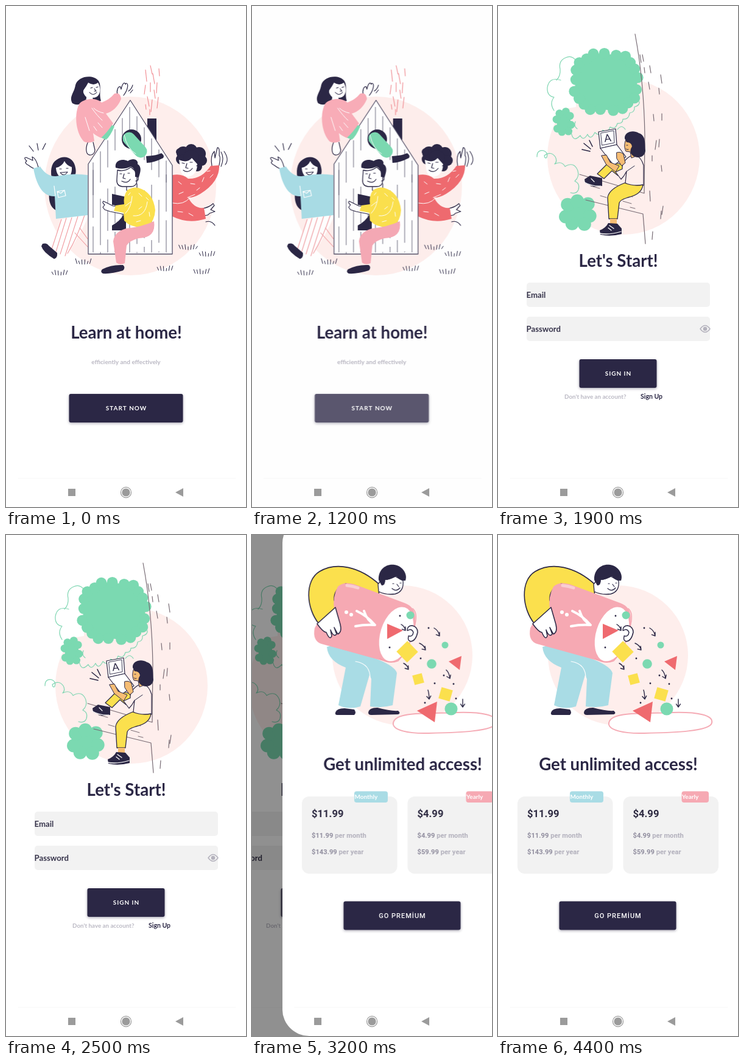
Recreate the animation shown at these times as an HTML page with a canvas. Size 394 by 824 pixels, loop 4900 ms.

```html
<!DOCTYPE html>
<html lang="en">
<head>
<meta charset="utf-8">
<title>Onboarding</title>
<style>
  html, body { margin: 0; width: 100%; height: 100%; overflow: hidden; background: #fff; }
  canvas { display: block; width: 394px; height: 824px; }
</style>
</head>
<body>
<canvas id="stage"></canvas>
<script>
const W = 394, H = 824, LOOP = 4900, STEP = 100;
const DPR = window.devicePixelRatio || 1;
const INK = '#2b2745', BLUSH = '#feeeec', PINK = '#f6a9b3', RED = '#ef6a6f', MINT = '#7bd9b1',
      YELLOW = '#fbe04d', SKY = '#a9dce5', GREY = '#f2f2f2', FAINT = '#bbb9c4', SKIN = '#f6bd74';
let g;

function layer(canvas) {
  canvas.width = W * DPR;
  canvas.height = H * DPR;
  const c = canvas.getContext('2d');
  c.scale(DPR, DPR);
  c.lineCap = c.lineJoin = 'round';
  return c;
}

function path(d, fill, stroke, width = 1.2) {
  const p = new Path2D(d);
  if (fill) { g.fillStyle = fill; g.fill(p); }
  if (stroke) { g.strokeStyle = stroke; g.lineWidth = width; g.stroke(p); }
}
const line = (d, color = INK, width = 1.2) => path(d, null, color, width);

function oval(x, y, rx, ry, fill, rot = 0) {
  g.beginPath();
  g.ellipse(x, y, rx, ry, rot, 0, 7);
  g.fillStyle = fill;
  g.fill();
}
const dot = (x, y, r, fill = INK) => oval(x, y, r, r, fill);

function box(x, y, w, h, r, fill) {
  g.beginPath();
  g.roundRect(x, y, w, h, r);
  g.fillStyle = fill;
  g.fill();
}

function text(s, x, y, font, color = INK, align = 'left', spacing = 0) {
  g.font = font;
  g.fillStyle = color;
  g.textAlign = align;
  g.textBaseline = 'alphabetic';
  g.letterSpacing = spacing + 'px';
  g.fillText(s, x + (align === 'center' ? spacing / 2 : 0), y);
  g.letterSpacing = '0px';
}
const lato = size => `bold ${size}px Lato, "Open Sans", sans-serif`;
const roboto = (size, weight = 'bold') => `${weight} ${size}px Roboto, Arial, sans-serif`;
const title = (s, y) => text(s, 197.5, y, lato(27.6), INK, 'center');

function button([x, y, w, h], label, font) {
  g.save();
  g.shadowColor = 'rgba(42,38,67,.4)';
  g.shadowBlur = 4 * DPR;
  g.shadowOffsetY = 1.5 * DPR;
  box(x, y, w, h, 3, INK);
  g.restore();
  text(label, x + w / 2, y + h / 2 + 3.8, font, '#fff', 'center', 1);
}

// Leafy shape: a squarish oval ringed with lobes.
function bush(x, y, rx, ry, n, r) {
  const bend = v => Math.sign(v) * Math.abs(v) ** .82;
  const rim = Array.from({ length: n }, (_, i) => {
    const a = i / n * Math.PI * 2 + .2, k = 1 + .04 * Math.sin(i * 2.3);
    return [x + bend(Math.cos(a)) * rx * k, y + bend(Math.sin(a)) * ry * k];
  });
  path('M' + rim.join('L') + 'Z', MINT);
  rim.forEach(([px, py]) => dot(px, py, r, MINT));
}

function grass(x, y, n) {
  for (let i = 0; i < n; i++) {
    const k = i - (n - 1) / 2;
    line(`M${x + k * 4.2} ${y - Math.abs(k) * .6}l${k * .9} ${-4 - 4 * Math.abs(Math.sin(i * 2 + x))}`, INK, 1);
  }
}

function house() {
  g.save();
  const wall = 'M204 155L135 260V408H273V262Z';
  path(wall, '#fff');
  g.clip(new Path2D(wall));
  for (let i = 0; i < 11; i++) {
    const x = 143 + i * 12, top = 155 + Math.abs(x - 204) * 1.52;
    const len = 28 + 25 * Math.abs(Math.cos(i * 2.7)), low = 270 + 50 * Math.abs(Math.sin(i * 1.9));
    line(`M${x} ${top + 10}v${len}M${x} ${low}V${low + len + 25}M${x} ${low + len + 40}V405`, '#5d5a70', .9);
  }
  g.restore();
  line(wall, '#55526a', 1.3);
}

function climber() {
  path('M109 160C103 149 112 143 114 130C118 115 142 112 151 122C158 130 152 143 156 156L148 158L132 152Q122 167 109 160Z', INK);
  path('M127 139C130 134 132 132 135 126Q144 132 151 126C157 136 155 151 143 151V159H131L132 150Q126 144 127 139Z', '#fff');
  line('M131 150V158M143 151V158M139 135l3-1M148 134l3-1M145 136l3 4l-3 0M137 142Q143 149 149 142', INK, 1.1);
  path('M183 147C181 139 184 131 188 133L189 137C191 127 195 124 196 129L197 127C202 127 200 138 193 147', '#fff', INK);
  line('M201 140q5-3 7-10M204 143l4-5', INK, 1.1);
  path('M139 218C133 223 130 235 133 242C136 247 145 246 146 237L143 224', '#fff', INK);
  path('M153 215L168 193L178 198Q171 215 164 220Z', MINT);
  path('M121 160C131 151 149 151 157 159Q170 154 178 144Q188 141 189 153Q181 172 164 177L176 193Q166 208 156 217Q147 213 143 209L145 222Q137 227 128 223C113 207 112 174 121 160Z', '#f9adb8');
  line('M141 168Q150 181 158 188M160 176Q150 174 144 168M130 183l7 22M151 192l7 8M144 198l5 7', '#fff', 1);
}

function runner() {
  path('M83 253C97 243 112 251 114 266C117 280 109 284 105 287L100 330Q94 343 82 336C67 328 69 304 76 288C72 271 74 259 83 253Z', INK);
  path('M82 266Q92 264 96 255Q99 262 108 265C109 278 102 285 95 284Q83 281 82 266Z', '#fff');
  line('M88 268h3M99 267h3M89 274Q95 282 101 273Z', INK, 1.2);
  path('M53 265Q49 250 43 248L44 254L33 249Q28 249 34 255Q29 258 37 262Q42 266 47 268', '#fff', INK);
  line('M38 230l7 9M51 226l2 11M65 226l-5 10', INK, 1.2);
  path('M91 351L75 400L98 412Q124 373 134 348V340Z', '#fff');
  line('M91 351L75 400M99 349L82 404M108 348L89 408M118 346L97 411M129 344Q117 381 101 407M113 373L134 396M121 365L134 383', '#f09a9f', 1.1);
  path('M45 267L56 264Q67 281 82 280Q108 274 134 278V344L82 350L80 313C61 314 50 295 45 267Z', SKY);
  line('M84 305l12-2l2 9l-12 3ZM84 305l6 3l6-5M81 312L79 296', '#fff', 1.2);
  path('M60 391Q67 389 70 394L84 406Q85 414 79 416Q61 405 58 395Z', INK);
}

function waver() {
  [[291, 242, 11], [304, 237, 10], [317, 243, 11], [321, 254, 9], [314, 264, 8], [288, 252, 9], [285, 240, 6], [304, 250, 13]]
    .forEach(([x, y, r]) => dot(x, y, r));
  path('M284 253Q298 259 305 250L314 260Q314 278 299 281Q287 280 286 266Z', '#fff');
  line('M289 258l4 1M302 257l4 0M297 259l-2 7l4 1M291 270Q299 276 306 267M313 263q4-4 3 3', INK, 1.2);
  path('M338 263Q335 246 342 239L343 250L347 233Q351 232 350 246Q353 248 349 266', '#fff', INK);
  line('M353 240q6 10 0 24M358 239q9 13 2 22M328 355q9-3 15 6', INK, 1.1);
  path('M323 333Q334 331 340 325L342 328L336 335L343 338L334 341Q331 346 322 344', '#fff', INK);
  path('M273 278Q289 275 299 284Q321 285 336 263L350 262Q351 289 319 309Q307 316 299 315Q309 334 325 332L328 350Q299 359 273 346Z', RED);
  line('M273 324Q292 328 302 315M298 315l12-5M283 289l5 4M303 292l7 1M322 289l3-7M335 282l5-5M284 309l7-3M282 338l8 1M300 341l7 4M330 272l5-1M313 303l5-4', '#fff', 1);
}

function rider() {
  dot(206, 219, 16);
  line('M202 218L221 239', MINT, 21);
  line('M194 212Q199 235 213 243', '#fff', .9);
  path('M230 247Q248 246 255 242Q261 246 258 250Q242 258 231 258Z', INK);
  path('M174 309L197 314V331L174 327Z', INK);
  path('M174 369V361Q187 354 193 343H197V369Z', INK);
  path('M197 331L176 329L160 321Q157 323 162 327L159 331L162 335L171 338L200 344Z', '#fff', INK);
  path('M198 291V303Q207 308 215 303V292', '#fff', INK);
  path('M183 270Q195 273 205 265L215 274V288Q214 297 205 297H191Q181 296 182 285Z', '#fff', INK, 1.3);
  path('M180 266C178 255 189 250 200 255C211 248 218 255 216 260C224 265 220 275 218 282L212 281Q213 267 205 264Q193 270 180 266Z', INK);
  line('M187 276h3M200 275h3M194 276l-2 7l4 1M190 288Q199 293 204 285M213 280q5-2 4 6l-4 2', INK, 1.2);
  path('M199 303Q208 297 217 299Q242 306 245 336Q244 353 233 363Q207 367 194 353L193 340L177 337L180 328L194 326Q192 313 199 303Z', YELLOW);
  line('M207 313Q206 331 196 341M196 329l9-7M232 322Q229 347 209 345M218 308l5 5M230 315l4 4M214 355l7-2M235 339l1 7M218 334l5-4M201 311l3-4', '#fff', 1);
  path('M243 354Q247 381 218 382Q202 386 198 394L195 423Q187 427 181 422L176 387Q178 371 197 366Q224 363 243 354Z', '#f5a9b5');
  path('M158 433Q173 425 192 426Q197 430 192 435Q173 441 159 440Q154 437 158 433Z', INK);
}

const START = [103.5, 638, 187, 47], SIGN = [133.5, 581, 127, 47], PREMIUM = [100.5, 602.5, 192, 47];

function welcome() {
  oval(204, 296, 141, 147, BLUSH);
  line('M237 98l3 14M251 103l1 12M229 105l2 19M241 111l3 17M248 126l-1 17M229 130l-2 15M237 126l0 15M243 138l2 14M232 149l3 16M240 154l-2 20M250 150l-2 18M229 162l1 8M236 170l0 9', '#f0868d', 1.1);
  box(232, 185, 15, 52, 0, INK);
  runner();
  waver();
  house();
  climber();
  rider();
  grass(88, 443, 6);
  grass(127, 425, 6);
  grass(261, 436, 6);
  grass(299, 401, 7);
  grass(330, 412, 6);
  grass(321, 441, 6);
  title('Learn at home!', 547);
  text('efficiently and effectively', 197, 588.5, lato(10.1), FAINT, 'center');
  button(START, 'START NOW', lato(10));
}

function tree() {
  const leaf = d => line(d, '#7fd6b2', 1.2);
  path('M128 90Q121 80 111 85Q99 90 102 104L96 120Q84 118 81 134Q80 148 92 150L95 172L128 166Z', '#fff');
  leaf('M128 90Q121 80 111 85Q99 90 102 104Q103 115 96 122M103 122Q84 116 81 134Q80 148 92 150Q84 160 92 172');
  bush(177, 125, 51, 47, 21, 9);
  bush(108, 191, 12, 17, 8, 6.5);
  bush(131, 340, 20, 20, 7, 11);
  leaf('M120 207q3 19 15 6q5 10 12-2q5 11 12-3q8 8 13-4q8 7 12-5q9 5 12-6q9 1 9-7q10 1 11-10q9-1 8-10q9-2 8-9M196 203q7-9 13 0M127 190q-3 8 3 12');
  leaf('M64 248Q64 236 75 238Q83 241 80 249Q77 252 76 246Q87 238 94 248Q98 255 93 260Q105 254 110 264Q125 255 131 271Q134 281 126 288Q135 292 132 302Q129 310 119 307');
}

function reader() {
  const bark = '#776b74';
  line('M225 46C234 94 240 151 241 213L240 308M238 342L242 391M134 277L240 308M144 319L238 342', bark, 1.2);
  line('M233 80l2 13M237 80l2 11M249 98l2 12M267 113l2 14M247 125l2 12M264 135l1 10M255 178l1 11M269 177l0 11M260 221l-2 15M265 219l-1 13M253 246l0 9M249 304l1 17M271 329l-2 14M268 337l-1 13M268 262l1 10M254 371l-1 13M240 101l1 9', bark, 1.2);
  line('M152 296l15 4M168 312l10 3M205 321l14 4M217 331l8 2M214 312l7 2', bark, 1);
  line('M138 236l13 3M141 226l11 9M150 221l5 10', INK, 1.6);
  path('M165 207L193 202L195 228L168 234Z', '#fff', INK);
  path('M169 209L190 205L191 225L171 229Z', null, INK, .9);
  g.save();
  g.translate(180, 217);
  g.rotate(-.12);
  text('A', 0, 6, '17px Lato, sans-serif', INK, 'center');
  g.restore();
  path('M163 276L183 256L209 262L197 279L187 271L174 284Z', YELLOW, INK);
  path('M168 234L195 228L210 248L190 262Z', '#fff', INK);
  path('M170 246L178 245L184 257L199 263L193 273L178 261Z', SKIN, INK, 1);
  path('M142 285L151 279L171 283V296L157 297L143 291Z', INK);
  line('M142 290Q155 297 169 296M153 284l5 5', '#fff', 1.2);
  path('M217 247Q203 256 204 268L193 273L202 285Q207 280 211 272L209 291Q220 300 239 295V262Q235 249 228 247Z', BLUSH, INK);
  line('M211 272L224 263', INK, 1);
  path('M238 294Q236 310 213 315Q200 319 199 324L196 350H182L180 315Q182 301 208 291Q223 297 238 294Z', YELLOW, INK, 1.3);
  path('M195 241Q202 239 206 244L209 258L203 263L195 251Z', SKIN, INK, 1);
  path('M209 222Q206 232 210 239L217 240L219 250L229 246L226 218Z', SKIN, INK, 1);
  path('M208 218C207 207 222 203 231 209C243 213 241 225 242 238C241 249 229 252 221 246Q214 240 220 231Q219 224 211 224Z', INK);
  line('M211 229h2M210 235q2 2 4 1', INK, 1);
  path('M184 350H195V358H184Z', SKIN);
  path('M167 369Q177 365 181 357L196 358L203 366V375Q184 380 168 376Z', INK);
  line('M167 374Q182 377 202 371M183 361l7 5M181 365l5 4', '#fff', 1.3);
}

function login() {
  oval(206, 248, 125, 128, BLUSH);
  tree();
  reader();
  title("Let's Start!", 428.5);
  [['Email', 455], ['Password', 511]].forEach(([s, y]) => {
    box(47, y, 301, 40, 5, GREY);
    text(s, 46.5, y + 25, lato(13.2), '#37344b');
  });
  path('M332 531Q340 520 348 531Q340 542 332 531Z', null, '#b4b2bd', 1.6);
  dot(340, 531, 3.3, '#b4b2bd');
  button(SIGN, 'SIGN IN', lato(10));
  text("Don't have an account?", 109, 646, lato(9.8), FAINT);
  text('Sign Up', 234, 646, lato(10.5));
}

function arrow(x, y, dx, dy) {
  const a = Math.atan2(dy, dx), tip = s => `l${-6 * Math.cos(a + s)} ${-6 * Math.sin(a + s)}`;
  const x2 = x + dx, y2 = y + dy;
  line(`M${x} ${y}Q${x + dx * .8} ${y + dy * .3} ${x2} ${y2}${tip(.6)}M${x2} ${y2}${tip(-.6)}`, INK, 1.4);
}

function tile(x, y, size, rot) {
  g.save();
  g.translate(x, y);
  g.rotate(rot);
  box(-size / 2, -size / 2, size, size, 0, YELLOW);
  g.restore();
}

function carrier() {
  path('M73 184Q75 207 104 218L92 280Q109 288 128 282L143 230L146 237L144 282Q163 285 181 280L188 227Q184 214 147 201L85 181Z', SKY);
  line('M120 208Q145 212 144 237', '#fff', 1.1);
  path('M87 292Q89 285 102 285L118 287Q122 292 118 296H90Q86 296 87 292Z', INK);
  path('M141 292Q142 284 156 284Q178 290 190 289Q195 293 190 295L146 296Q141 296 141 292Z', INK);
  path('M60 146C39 121 36 75 61 60C88 44 126 51 160 82L158 98L104 80Q84 88 85 107L89 119Z', YELLOW, INK, 1.6);
  path('M91 85Q100 76 118 81L201 112Q217 118 218 135Q219 177 190 206Q180 211 169 208L64 179Q49 174 53 153L58 144L85 124Q82 101 91 85Z', PINK);
  oval(187, 163, 26, 46, '#fff', .3);
  line('M214 121Q222 128 218 146Q211 184 190 207Q174 213 160 203', '#f4a0ac', 1.4);
  line('M106 83Q116 84 124 87', '#f9cdd2', 5);
  path('M57 146L87 119L95 147Q98 160 91 163L85 152L89 163Q84 169 79 156L81 166Q78 174 72 160Q67 160 57 146Z', '#fff', INK, 1.5);
  line('M122 125Q139 133 151 147M134 125Q139 141 152 148Q135 147 120 150', '#fff', 4);
  dot(105, 127, 3, '#fff');
  dot(113, 131, 3, '#fff');
  path('M163 73Q176 75 183 67L198 75Q200 93 185 97Q170 99 158 93L157 81Z', '#fff', INK, 1.3);
  path('M158 74C157 58 169 47 184 49C198 51 206 65 202 75Q193 76 187 68Q175 75 169 73Q169 83 163 83Z', INK);
  line('M181 80h2M193 79h2M188 81l3 4M180 88Q187 94 193 87', INK, 1.2);
}

function confetti() {
  path('M172 146L172 171L198 157Z', RED);
  path('M273 208L294 199L291 222Z', RED);
  path('M221 289L254 274L250 308Z', RED);
  tile(205, 192, 25, .8);
  tile(223, 237, 16, -.26);
  tile(268, 262, 19, .28);
  [[210, 132, 6.5], [245, 212, 7.8], [267, 181, 5.5], [277, 286, 10.5]].forEach(([x, y, r]) => dot(x, y, r, MINT));
  [[240, 153], [227, 203], [265, 231], [281, 245], [250, 244], [234, 276], [285, 269], [193, 133], [176, 185]]
    .forEach(([x, y]) => dot(x, y, 1.4));
  [[249, 153, 9, 13], [225, 178, 10, 11], [199, 211, 8, 10], [269, 222, 6, 14], [239, 255, 2, 15], [296, 270, 0, 13], [195, 147, 7, 10]]
    .forEach(a => arrow(...a));
  path('M205 157Q205 149 213 149Q222 151 222 160Q219 174 211 175Q205 174 207 167M206 157Q212 153 215 160Q214 168 207 166', '#fff', INK, 1.5);
}

function plan(x, price, yearly, tagX, tagW, tag, color) {
  box(x, 430, 156.5, 127, 12, GREY);
  box(tagX, 421.5, tagW, 18.5, 4, color);
  text(tag, tagX + .5, 434, lato(10), '#fff');
  text(price, x + 16, 463.5, roboto(16.6), '#2e2b42');
  [[price, ' per month', 498], [yearly, ' per year', 525]].forEach(([sum, unit, y]) => {
    text(sum, x + 16, y, roboto(11.2), '#918e9f');
    text(unit, x + 16 + g.measureText(sum).width, y, roboto(11.2), '#b3b1bd');
  });
}

function offer() {
  dot(197, 198, 115, BLUSH);
  path('M182 309C185 290 236 294 287 292C327 291 354 296 351 309C348 323 288 325 240 326C207 327 180 321 182 309Z', '#fff', '#f5abb5', 2);
  carrier();
  confetti();
  title('Get unlimited access!', 387);
  plan(32, '$11.99', '$143.99', 118, 55, 'Monthly', SKY);
  plan(205.5, '$4.99', '$59.99', 301.5, 44.5, 'Yearly', PINK);
  button(PREMIUM, 'GO PREMİUM', roboto(11, 500));
}

function render(draw) {
  const canvas = document.createElement('canvas');
  g = layer(canvas);
  box(0, 0, W, H, 0, '#fff');
  draw();
  line('M20 777H377', '#f7f7f7', 1);
  return canvas;
}

const screens = [welcome, login, offer].map(render);
const moves = [{ start: 1195, tap: START }, { start: 3011, tap: SIGN }];
const view = layer(document.getElementById('stage'));

function navBar() {
  const c = '#9b9b9b';
  box(102, 794, 12, 12, 0, c);
  dot(197, 800, 6.6, c);
  g.beginPath();
  g.arc(197, 800, 8.6, 0, 7);
  g.strokeStyle = c;
  g.lineWidth = 1.2;
  g.stroke();
  path('M278 800L291 793V807Z', c);
}

// Critically damped spring: share of the way still to go.
function remaining(ms) {
  const k = Math.max(0, ms) * .019;
  return (1 + k) * Math.exp(-k);
}

function paint(t) {
  g = view;
  const put = (i, x) => g.drawImage(screens[i], x, 0, W, H);
  const now = t < 2500 ? 0 : 1;
  const { start, tap } = moves[now];
  const left = remaining(t - start), x = W * left;

  if (x < .5) {
    put(now + 1, 0);
  } else {
    const shift = -.25 * W * (1 - left);
    box(0, 0, W, H, 0, '#fff');
    put(now, shift);
    const press = Math.min(1, Math.max(0, (t - start + 150) / 110));
    if (press) box(tap[0] + shift, tap[1], tap[2], tap[3], 3, `rgba(255,255,255,${.22 * press})`);
    if (left < 1) {
      box(0, 0, W, H, 0, `rgba(0,0,0,${.5 * (1 - left)})`);
      g.save();
      g.beginPath();
      g.roundRect(x, -30, W + 60, H + 30, 44);
      g.clip();
      put(now + 1, x);
      g.restore();
    }
  }
  navBar();
}

const origin = performance.now();
function tick() {
  const t = (performance.now() - origin) % LOOP;
  paint(Math.floor((t + 4) / STEP) * STEP % LOOP);
  requestAnimationFrame(tick);
}
tick();
</script>
</body>
</html>
```
